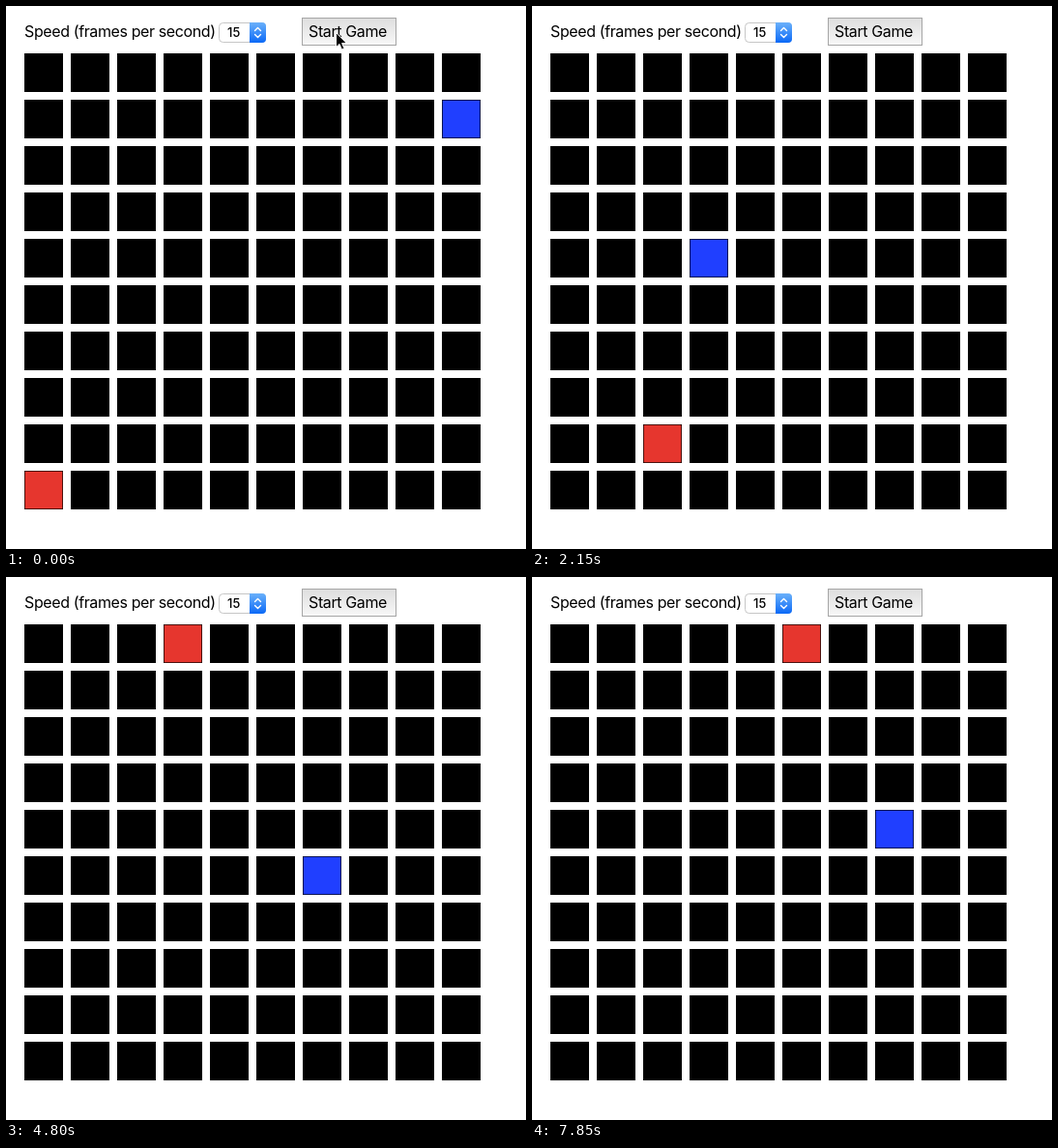
An HTML page for the animation above (8000 ms loop, 538 by 562 pixels).

```html
<!DOCTYPE html>
<html lang="en">
<head>
<meta charset="utf-8">
<title>Grid chase</title>
<style>
  html, body { margin: 0; width: 100%; height: 100%; overflow: hidden; background: #fff; }
  svg { display: block; width: 538px; height: 562px; }
  text { font-family: Inter, Roboto, sans-serif; font-size: 16px; letter-spacing: -.024em; fill: #000; }
  .value { font-size: 13px; font-weight: 500; letter-spacing: 0; }
  .player { width: 39px; height: 39px; stroke: #000; stroke-opacity: .35; }
  .cursor { animation: glide 8s linear infinite; }
  @keyframes glide {
    0%, 2.5% { transform: translate(341px, 27px); }
    8.75%, 9.3% { transform: translate(479px, 43px); }
    12.5% { transform: translate(517px, 22px); visibility: visible; }
    12.51%, 100% { transform: translate(517px, 22px); visibility: hidden; }
  }
</style>
</head>
<body>
<svg viewBox="0 0 538 562">
  <defs>
    <linearGradient id="face" x2="0" y2="1">
      <stop stop-color="#dedede"/><stop offset="1" stop-color="#f8f8f8"/>
    </linearGradient>
    <linearGradient id="stepper" x2="0" y2="1">
      <stop stop-color="#6bb1fa"/><stop offset="1" stop-color="#0b69f7"/>
    </linearGradient>
    <pattern id="cells" x="19" y="49" width="48" height="48" patternUnits="userSpaceOnUse">
      <rect width="40" height="40"/>
    </pattern>
  </defs>

  <text x="19" y="32">Speed (frames per second)</text>

  <rect x="220.5" y="17.5" width="48" height="20" rx="4" fill="#fff" stroke="#c6c6c6"/>
  <path d="M252 17h13a4 4 0 0 1 4 4v13a4 4 0 0 1-4 4h-13z" fill="url(#stepper)"/>
  <path d="M257.5 25.5l3-3 3 3M257.5 29.5l3 3 3-3" fill="none" stroke="#fff" stroke-width="1.4" stroke-linecap="round" stroke-linejoin="round"/>
  <text class="value" x="229" y="32">15</text>

  <rect x="306.5" y="12.5" width="97" height="28" fill="url(#face)" stroke="#a6a6a6"/>
  <text x="313" y="32">Start Game</text>

  <rect x="19" y="49" width="480" height="480" fill="url(#cells)"/>
  <rect id="red" class="player" fill="#e6362e"/>
  <rect id="blue" class="player" fill="#203fff"/>

  <g class="cursor">
    <path d="M.5.5v15.2l3.5-3.3 2.4 5.6 2.6-1.1-2.4-5.4h4.7z" fill="#000" stroke="#fff"/>
  </g>
</svg>
<script>
  const LOOP = 8000, TICK = 200, PITCH = 48;

  // Goals: time of the first step, column, row.
  const goals = {
    blue: [
      [0, 9, 1], [200, 8, 4], [1200, 3, 4], [2200, 7, 4], [3000, 6, 5],
      [5000, 9, 4], [6200, 9, 5], [6400, 9, 4], [7000, 9, 5], [7600, 7, 4]
    ],
    red: [
      [0, 0, 9], [1400, 2, 8], [2200, 1, 6], [2800, 3, 4],
      [3650, 3, 0], [5400, 6, 0], [7600, 5, 0]
    ]
  };

  const approach = (from, to, steps) =>
    from + Math.sign(to - from) * Math.min(steps, Math.abs(to - from));

  // One cell per tick towards the current goal, diagonals allowed.
  function cellAt(route, time) {
    const current = route.findLastIndex(([start]) => start <= time);
    const [start, col, row] = route[current];
    const [, fromCol, fromRow] = route[Math.max(0, current - 1)];
    const steps = Math.floor((time - start) / TICK) + 1;
    return current ? [approach(fromCol, col, steps), approach(fromRow, row, steps)] : [col, row];
  }

  function draw() {
    const time = performance.now() % LOOP;
    for (const [id, route] of Object.entries(goals)) {
      const [col, row] = cellAt(route, time);
      const player = document.getElementById(id);
      player.setAttribute("x", 19.5 + PITCH * col);
      player.setAttribute("y", 49.5 + PITCH * row);
    }
    requestAnimationFrame(draw);
  }
  draw();
</script>
</body>
</html>
```
